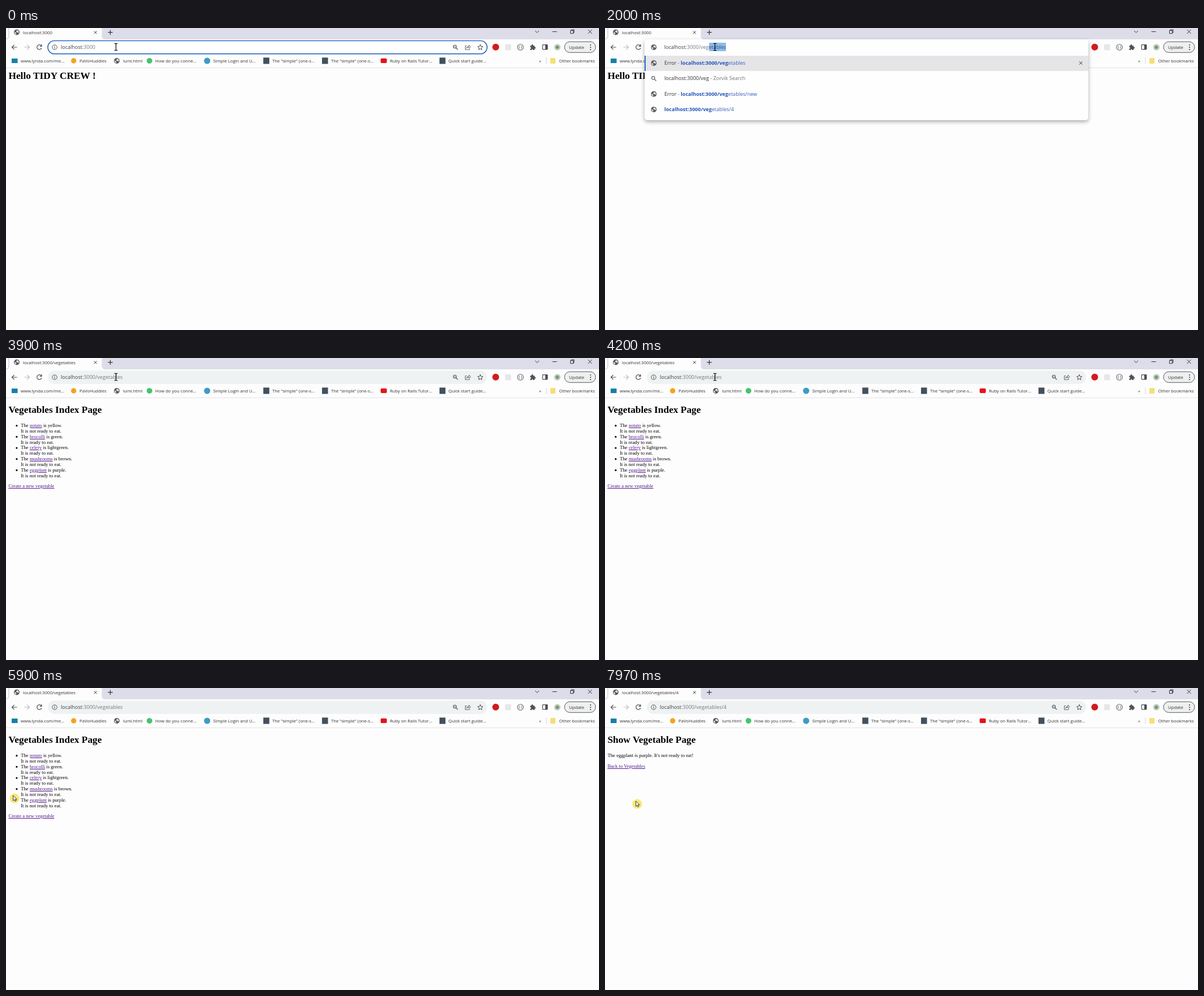
Animation of 1049x534 px, one loop 8 s. Source, as an HTML page:

```html
<!DOCTYPE html>
<html lang="en">
<head>
<meta charset="utf-8">
<title>Browser demo</title>
<style>
  html, body { margin: 0; width: 100%; height: 100%; overflow: hidden; background: #fdfdfd; }
  #stage { position: relative; width: 1049px; height: 534px; overflow: hidden; background: #fdfdfd;
    font-family: "Open Sans", "Noto Sans", sans-serif; color: #333; }
  #stage svg { position: absolute; left: 0; top: 0; overflow: visible; }
  .t { position: absolute; white-space: pre; line-height: 20px; font-size: 7.7px; }
  .url { font-size: 9.05px; color: #77797c; }
  .url i, .row i { font-style: normal; color: #3c3e41; }
  .url .sel { background: #8cbcf0; color: #39506c; padding: .8px 0; }
  .caret { border-left: 1px solid #222; margin-right: -1px; padding: .5px 0; }
  .row { font-size: 9.05px; color: #707276; }
  .row i { color: #333; }
  .row b { font-weight: 700; color: #1c1c1e; }
  .row u { text-decoration: none; color: #3560bb; }
  .row u b { color: #2455b8; }
  .page .t { font: 8.72px/20px "Liberation Serif", "Times New Roman", serif; color: #000; }
  .page .h { font-size: 17.35px; font-weight: 700; }
  .page a { color: #551a8b; text-decoration: underline; }
  #drop { position: absolute; left: 70px; top: 20px; width: 785px; background: #fefefe;
    border-radius: 5px; box-shadow: 0 3px 7px rgba(0,0,0,.32); }
  #drop .hit { position: absolute; left: 0; top: 28.5px; width: 783px; height: 27.3px;
    background: #e5e5e7; border-left: 2px solid #2a6bd0; }
</style>
</head>
<body>
<div id="stage">
  <svg width="1049" height="534" id="frame"></svg>
  <div id="labels"></div>
  <div id="page" class="page"></div>
  <div id="bar"></div>
  <div id="drop"></div>
  <div id="input"></div>
  <svg width="1049" height="534" id="pointer">
    <circle id="halo" r="8.6" fill="#f7e768" opacity=".9"/>
    <g id="beam" fill="none" stroke="#111" stroke-width="1.3">
      <path d="M-2.8-6.2H-1L0-5.4L1-6.2H2.8M0-5.4V5.4M-2.8 6.2H-1L0 5.4L1 6.2H2.8"/>
    </g>
    <g id="arrow">
      <path d="M-2.4-5V4.2L-.2 2.3L1.2 5.4L2.7 4.7L1.4 1.7H4.2Z" fill="#fff" stroke="#222" stroke-width=".9"/>
    </g>
    <g id="hand">
      <path d="M-3-4.6Q-2.2-5.6-1.4-4.6V-1L3.2 0Q4.2.4 4 1.6L3.2 5.4H-1.8L-5 1.6Q-5 .2-3 1.4Z"
        fill="#fff" stroke="#222" stroke-width=".9" stroke-linejoin="round"/>
    </g>
  </svg>
</div>
<script>
const LOOP = 8000;
const HOST = "localhost:3000";
const WORD = "vegetables";
const OPEN = 500, ENTER = 3900, SHOW = 7660;
const KEYS = [1450, 1640, 1900, 2180, 2480, 2720, 2970, 3200, 3480, 3650];
// time, x, y of the pointer
const PATH = [
  [4450, 194.5, 33.5], [5050, 80, 165], [5780, 19, 194], [5900, 15, 195],
  [6250, 14, 196], [6850, 57, 205]
];

const $ = id => document.getElementById(id);
const text = (x, y, html, cls = "", style = "") =>
  `<div class="t ${cls}" style="left:${x}px;top:${y - 10}px;${style}">${html}</div>`;
const line = (d, color = "#4a4c50", w = 1.1) =>
  `<path d="${d}" fill="none" stroke="${color}" stroke-width="${w}"/>`;
const box = (x, y, w, h, fill, r = 0, extra = "") =>
  `<rect x="${x}" y="${y}" width="${w}" height="${h}" rx="${r}" fill="${fill}" ${extra}/>`;
const dot = (x, y, r, fill, extra = "") => `<circle cx="${x}" cy="${y}" r="${r}" fill="${fill}" ${extra}/>`;
const at = (x, y, body) => `<g transform="translate(${x} ${y})">${body}</g>`;
const cross = (x, y, r, color) =>
  at(x, y, line(`M${-r} ${-r}L${r} ${r}M${r} ${-r}L${-r} ${r}`, color, 1));
const globe = (x, y) => at(x, y, dot(0, 0, 4.9, "#54585d") +
  `<path d="M-3.8-.8L-1 1.2V3.9Q-3.9 2.9-3.8-.8ZM-.6-3.7Q3-3.6 3.7 0L2.8 1.6L1-.2H-1.3L-1-1.7L.6-2Z" fill="#eef0f2"/>`);
const lens = (x, y) => at(x, y, line("M1.3 1.3L4.2 4.2", "#55585c", 1.3) +
  dot(-1, -1, 2.7, "none", 'stroke="#55585c" stroke-width="1.1"'));
const layer = body => `<svg width="1049" height="534">${body}</svg>`;

function drawFrame() {
  const gray = "#4a4c50";
  $("frame").innerHTML =
    `<defs><radialGradient id="face"><stop offset="0" stop-color="#56705c"/>
      <stop offset=".55" stop-color="#a9bda6"/><stop offset="1" stop-color="#dfe6dc"/></radialGradient></defs>` +
    box(0, 0, 1049, 20, "#dcdde8") +
    `<path d="M0 0H4V14Q4 18 0 19ZM2 20Q6 19 6 15V0H169.500V15Q170 19 174 20Z" fill="#fdfdfd"/>` +
    globe(19, 7.5) + cross(158.3, 7.8, 2.4, "#333") +
    line("M180.300 7.700H188.700M184.500 3.500V11.900", "#333", 1.2) +
    line("M936 4.800L939.500 8.200L943 4.800M966.500 6.500H974.500", "#333", 1) +
    line("M998.500 4.500H1003.500V9.700H998.500ZM1000 4.500V3H1005V8.200H1003.500", "#333", 1) +
    cross(1033, 6.5, 3.5, "#333") +
    line("M19.500 34H10.700M14.700 29.800L10.500 34L14.700 38.200", gray, 1.2) +
    line("M32.500 34H41.300M37.300 29.800L41.500 34L37.300 38.200", "#b9bbbf", 1.2) +
    line("M62.300 31.300A4.200 4.200 0 1 0 63 35.200M63 29V32.300H59.700", gray, 1.2) +
    dot(866.3, 33.8, 6, "#d01c1f") + box(883, 28.8, 10.4, 10.4, "#e6e7e9", 1) +
    dot(910, 34, 5.2, "none", 'stroke="#606266" stroke-width="1.100"') +
    line("M909 31.500Q907.800 31.500 908 33Q908 34 907.200 34Q908 34 908 35Q907.800 36.500 909 36.500M911 31.500Q912.200 31.500 912 33Q912 34 912.800 34Q912 34 912 35Q912.200 36.500 911 36.500", "#606266", .8) +
    box(927.3, 31.3, 7.8, 7.6, "#4f5256", 1) + dot(931, 30.7, 1.6, "#4f5256") +
    dot(935.5, 35, 1.6, "#4f5256") + dot(927.6, 35.2, 1.3, "#fdfdfd") + dot(931.2, 38.6, 1.2, "#fdfdfd") +
    box(949.2, 29.7, 8.6, 8.2, "none", .8, `stroke="${gray}" stroke-width="1.200"`) + box(954, 29.7, 4, 8.2, gray) +
    dot(975.3, 34, 6, "url(#face)") +
    box(988, 24.3, 55, 19, "#eef0f0", 9.5, 'stroke="#55575b" stroke-width="1"') +
    [30, 34, 38].map(y => dot(1034, y, 1, "#333")).join("") +
    box(10, 54, 10.5, 8, "#1580a8") + dot(119.7, 58, 4.7, "#f5a31c") + globe(196, 58) +
    dot(253.8, 58, 5, "#46c46c") + dot(355.8, 58, 5.5, "#3b9cc6") +
    [455.2, 559, 766.8].map(x => box(x, 52.3, 10.6, 11.2, "#42505f")).join("") +
    box(662.7, 53.8, 11, 8.2, "#e5131b", 2) +
    line("M956 52V63.500", "#d2d4d8", 1) + box(963, 53, 9, 10, "#f6de77", 1) +
    line("M0 70.300H1049", "#e2e3e6", 1);

  const marks = [
    [26, "www.lynda.com/me..."], [130, "PaVoHuddles"], [207, "lumi.html"],
    [264, "How do you conne..."], [366.5, "Simple Login and U..."],
    [471, 'The "simple" (one-s...'], [575, 'The "simple" (one-s...'],
    [679, "Ruby on Rails Tutor..."], [782.5, "Quick start guide..."],
    [943, "»"], [978.5, "Other bookmarks"]
  ];
  $("labels").innerHTML = marks.map(([x, s]) => text(x, 57.6, s)).join("") +
    text(996, 33.6, "Update", "", "font-size:7.900px") + text(30, 7.5, '<span id="tab"></span>');
}

const pages = {
  home: () => text(4.4, 85, "Hello TIDY CREW !", "h"),
  list() {
    const items = [["potato", "yellow", 0], ["brocolli", "green", 1], ["celery", "lightgreen", 1],
      ["mushrooms", "brown", 0], ["eggplant", "purple", 0]];
    const y = i => 119 + i * 19.67;
    return text(4.4, 92, "Vegetables Index Page", "h") +
      layer(items.map((_, i) => dot(18.9, y(i) + .7, 1.6, "#000")).join("")) +
      items.map(([name, color, ready], i) =>
        text(26.2, y(i), `The <a>${name}</a> is ${color}.`) +
        text(26.2, y(i) + 9.85, `It is ${ready ? "" : "not "}ready to eat.`)).join("") +
      text(4.4, 226, "<a>Create a new vegetable</a>");
  },
  show: () => text(4.4, 92, "Show Vegetable Page", "h") +
    text(4.4, 119, "The eggplant is purple. It's not ready to eat!") +
    text(4.4, 137.5, "<a>Back to Vegetables</a>")
};

const paths = { home: "", list: "/vegetables", show: "/vegetables/4" };

function drawBar(path, focused) {
  $("bar").innerHTML = layer(
    (focused
      ? box(74, 22.5, 777, 23.2, "#fefefe", 11.6, 'stroke="#2a6cc4" stroke-width="1.700"')
      : box(74, 22.5, 777, 23.2, "#eff2f2", 11.6)) +
    dot(86, 34, 4.2, "none", 'stroke="#55585c" stroke-width="1"') +
    line("M86 33.300V36.500M86 31.300V32.400", "#55585c", 1.1) +
    lens(795, 34) + line("M792.500 33H795.500", "#55585c", .9) +
    line("M815 31.500H812.500V38.300H820V36.500M814.500 36Q815 32.500 819 32.300V30L822 33.200L819 36V34Q816 34 814.500 36Z", "#55585c", .9) +
    line("M839 29.300L840.300 32.500L843.700 32.800L841.100 35L841.900 38.400L839 36.600L836.100 38.400L836.900 35L834.300 32.800L837.700 32.500Z", "#4a4c50", 1)
  ) + text(97, 33.8, `<i>localhost</i>:3000${path}`, "url");
}

function suggestions(typed) {
  const link = (bold, rest) => `<u><b>${bold}</b>${rest}</u>`;
  const head = HOST + "/" + typed;
  const search = `<i>${head}</i> - Zorvik Search`;
  if (!typed) {
    const pair = tail => `<b>${head}</b><i>${tail}</i> - ${link(head, tail)}`;
    return [`<b>${HOST}</b> - ${link(HOST, "")}`, search,
      `<i>Error</i> - ${link(head, "fruits")}`, `<i>Error</i> - ${link(head, WORD)}`,
      pair("greetings/:name"), pair("fruits/new")];
  }
  const rest = WORD.slice(typed.length);
  return [`<i>Error</i> - ${link(head, rest)}`, search,
    `<i>Error</i> - ${link(head, rest + "/new")}`, link(head, rest + "/4")];
}

function drawDrop(typed) {
  const rows = suggestions(typed);
  const y = i => 42 + i * 27.35;
  $("drop").style.height = 33.5 + rows.length * 27.35 + "px";
  $("drop").innerHTML = '<div class="hit"></div>' +
    layer(globe(16.3, 14) + cross(771.7, y(0), 2.8, "#333") +
      rows.map((_, i) => (i === 1 ? lens : globe)(16.3, y(i))).join("")) +
    rows.map((r, i) => text(35, y(i) - .2, r, "row")).join("");
}

function drawInput(typed, caret) {
  const rest = typed && WORD.slice(typed.length);
  const tail = rest ? `<span class="sel">${rest}</span>` : caret ? '<span class="caret"></span>' : "";
  $("input").innerHTML = text(104.7, 33.8, `<i>localhost</i>:3000/${typed}${tail}`, "url");
}

function pointerAt(t) {
  const i = PATH.findIndex(p => p[0] > t);
  if (i === 0) return PATH[0].slice(1);
  if (i < 0) return PATH[PATH.length - 1].slice(1);
  const [a, b] = [PATH[i - 1], PATH[i]];
  const k = (t - a[0]) / (b[0] - a[0]);
  const e = k * k * (3 - 2 * k);
  return [a[1] + (b[1] - a[1]) * e, a[2] + (b[2] - a[2]) * e];
}

const last = {};
function once(slot, key, fn) {
  if (last[slot] !== key) { last[slot] = key; fn(); }
}

function render(t) {
  const page = t < ENTER ? "home" : t < SHOW ? "list" : "show";
  const open = t >= OPEN && t < ENTER;
  const typed = WORD.slice(0, KEYS.filter(k => k <= t).length);
  const caret = (t - OPEN) % 1060 < 560;

  once("page", page, () => {
    $("page").innerHTML = pages[page]();
    $("tab").textContent = HOST + paths[page];
    drawBar(paths[page], page === "home");
  });
  once("open", open, () => {
    $("drop").style.display = $("input").style.display = open ? "" : "none";
    $("bar").style.display = open ? "none" : "";
  });
  if (open) {
    once("drop", typed, () => drawDrop(typed));
    once("input", typed + caret, () => drawInput(typed, caret));
  }

  const [x, y] = pointerAt(t);
  const onLink = page === "list" && x > 46 && x < 74 && y > 198 && y < 208;
  const kind = y < 46 ? "beam" : onLink ? "hand" : "arrow";
  for (const id of ["beam", "arrow", "hand", "halo"]) {
    const shown = id === kind || (id === "halo" && t > PATH[0][0]);
    $(id).style.display = shown ? "" : "none";
    $(id).setAttribute("transform", `translate(${x} ${y})`);
  }
}

drawFrame();
const start = performance.now();
function tick() {
  render((performance.now() - start) % LOOP);
  requestAnimationFrame(tick);
}
tick();
</script>
</body>
</html>
```
